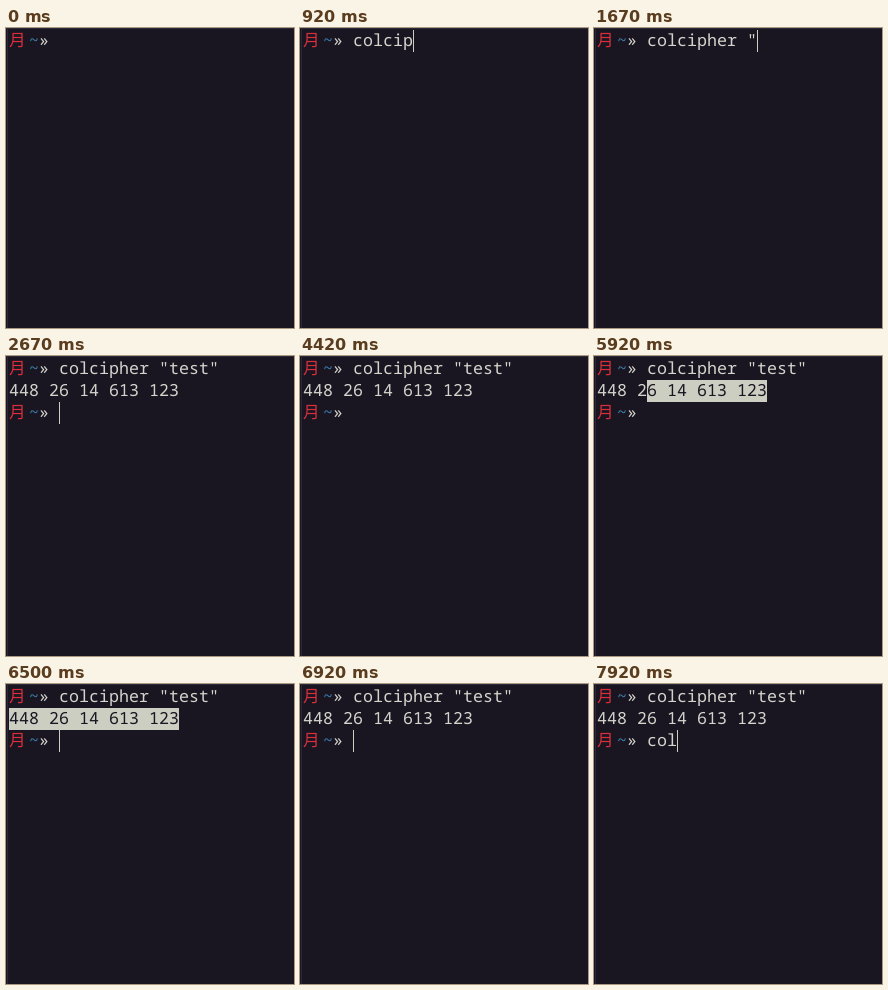
An HTML page that plays this animation: 288 px wide and 300 px high, repeating every 8000 ms.

```html
<!DOCTYPE html>
<html lang="en">
<head>
<meta charset="utf-8">
<title>Terminal</title>
<style>
  html, body { margin: 0; width: 288px; height: 300px; overflow: hidden; background: #191622; }
  svg { display: block; }
  text {
    font: 16.667px "Noto Sans Mono", "DejaVu Sans Mono", monospace;
    text-rendering: geometricPrecision;
    white-space: pre;
    fill: #d4d4cc;
  }
  .moon { font-family: "Noto Sans CJK JP", "Noto Sans CJK", sans-serif; fill: #d92f3d; }
  .path { fill: #3f7fae; }
  .dark { fill: #191622; }
  .block { fill: #cdcec2; }
  .edge { fill: #2b2936; }
</style>
</head>
<body>
<svg width="288" height="300" viewBox="0 0 288 300">
  <defs>
    <g id="prompt">
      <text class="moon" x="3" y="18">月</text>
      <text class="path" x="23" y="18">~</text>
      <text x="33" y="18">»</text>
    </g>
  </defs>
  <rect class="edge" width="288" height="1"/>
  <rect class="edge" x="1" width="1" height="300"/>

  <use href="#prompt"/>
  <text id="first" x="53" y="18"></text>

  <g id="result">
    <rect id="selection" class="block" y="24" height="22"/>
    <text x="3" y="40"><tspan id="plain"></tspan><tspan id="picked" class="dark"></tspan></text>
    <use href="#prompt" y="44"/>
    <text id="second" x="53" y="62"></text>
  </g>

  <rect id="cursor" class="block" width="1" height="22"/>
</svg>
<script>
const LOOP = 8000, CELL = 10, LINE = 22, LEFT = 3, TOP = 2, PROMPT = 5;
const OUTPUT = "448 26 14 613 123";
const ENTER = 2670, CLOSE_QUOTE = 1830, STEP_BACK = 2000, DESELECT = 6920;

const firstText = 'colcipher "test';
const firstKeys = [80, 250, 500, 580, 670, 920, 1170, 1250, 1330, 1420, 1670, 2170, 2170, 2330, 2420];
const secondText = "col";
const secondKeys = [7580, 7670, 7830];
const blinks = [80, ENTER, ENTER, 3250, 3830, 4420, 5080, 5670, 6330, 7250, 7580];

// Left end of the selection while it is dragged from the right
const dragStart = 5580, dragStep = 83.4;
const dragColumns = [16, 14, 11, 8, 5, 4, 2, 1, 0];

const el = id => document.getElementById(id);
const passed = (times, t) => times.filter(time => t >= time).length;

function selectionStart(t) {
  if (t < dragStart || t >= DESELECT) return OUTPUT.length;
  const step = Math.floor((t - dragStart) / dragStep);
  return dragColumns[Math.min(step, dragColumns.length - 1)];
}

function draw(t) {
  const entered = t >= ENTER;
  const first = firstText.slice(0, passed(firstKeys, t));
  const second = secondText.slice(0, passed(secondKeys, t));
  el("first").textContent = first + (t >= CLOSE_QUOTE ? '"' : "");
  el("second").textContent = second;
  el("result").setAttribute("visibility", entered ? "visible" : "hidden");

  const start = selectionStart(t);
  el("plain").textContent = OUTPUT.slice(0, start);
  el("picked").textContent = OUTPUT.slice(start);
  el("selection").setAttribute("x", LEFT + start * CELL);
  el("selection").setAttribute("width", (OUTPUT.length - start) * CELL);

  const pastQuote = t >= CLOSE_QUOTE && t < STEP_BACK ? 1 : 0;
  const column = PROMPT + (entered ? second.length : first.length + pastQuote);
  const cursor = el("cursor");
  cursor.setAttribute("x", LEFT + column * CELL);
  cursor.setAttribute("y", TOP + (entered ? 2 * LINE : 0));
  cursor.setAttribute("visibility", passed(blinks, t) % 2 ? "visible" : "hidden");
}

const origin = performance.now();
function tick() {
  draw((performance.now() - origin) % LOOP);
  requestAnimationFrame(tick);
}
tick();
</script>
</body>
</html>
```
